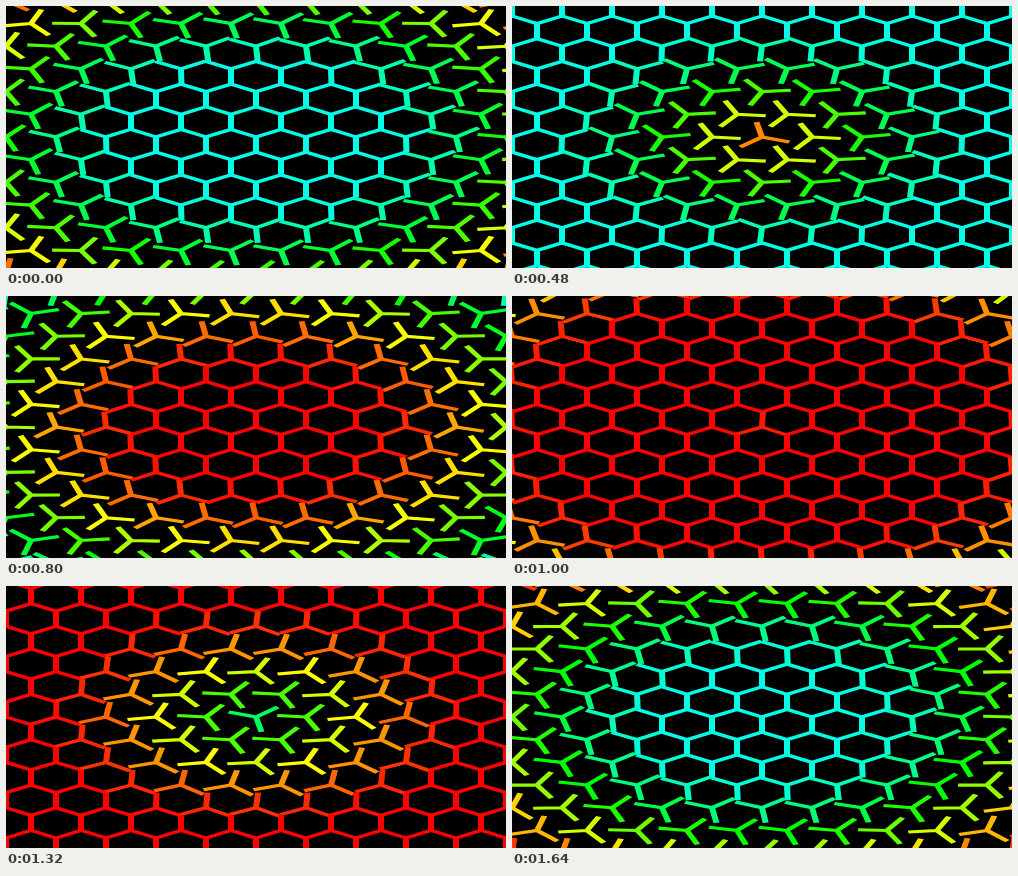
Recreate the animation shown at these times as an HTML page with a canvas. Size 500 by 262 pixels, loop 1680 ms.

```html
<!DOCTYPE html>
<html lang="en">
<head>
<meta charset="utf-8">
<title>Hexagon wave</title>
<style>
  html, body { margin: 0; width: 100%; height: 100%; overflow: hidden; background: #000; }
  canvas { display: block; }
</style>
</head>
<body>
<canvas id="stage" width="500" height="262"></canvas>
<script>
const ctx = document.getElementById('stage').getContext('2d');
const SIZE = 500, SQUASH = 262 / SIZE;
const LOOP = 1680, HALF = LOOP / 2, STEP = 40;
const GAP = 50, ARM = GAP / Math.sqrt(3), ROW = ARM * 1.5;
const TURN_START = 100, TURN_TIME = 530, DELAY = HALF / SIZE;
const MAX_HUE = 174;

const cells = [];
for (let row = -7; row <= 7; row++) {
  for (let col = -7; col <= 7; col++) {
    const x = (col + (row & 1) / 2) * GAP, y = row * ROW;
    cells.push({ x, y, delay: Math.hypot(x, y) * DELAY });
  }
}

const tip = a => [ARM * Math.sin(a), -ARM * Math.cos(a)];

const star = new Path2D();
star.moveTo(...tip(-Math.PI / 3));
star.lineTo(0, 0);
star.lineTo(...tip(Math.PI / 3));
star.moveTo(0, 0);
star.lineTo(...tip(Math.PI));

// Two turns of 60° per loop: cyan to red, then red to cyan.
function pose(time) {
  const t = ((time % LOOP) + LOOP) % LOOP;
  const second = t >= HALF;
  const x = Math.min(1, Math.max(0, (t % HALF - TURN_START) / TURN_TIME));
  const turn = (1 - Math.cos(Math.PI * x)) / 2;
  return {
    angle: (turn + second) * Math.PI / 3,
    hue: MAX_HUE * (second ? turn : 1 - turn)
  };
}

function draw(time) {
  ctx.setTransform(1, 0, 0, 1, 0, 0);
  ctx.fillStyle = '#000';
  ctx.fillRect(0, 0, 500, 262);
  ctx.lineWidth = 6;
  for (const { x, y, delay } of cells) {
    const { angle, hue } = pose(time - delay);
    ctx.setTransform(1, 0, 0, SQUASH, 250, 131);
    ctx.translate(x, y);
    ctx.rotate(angle);
    ctx.strokeStyle = `hsl(${hue}, 100%, 50%)`;
    ctx.stroke(star);
  }
}

function tick() {
  draw(Math.floor(performance.now() / STEP) * STEP);
  requestAnimationFrame(tick);
}
tick();
</script>
</body>
</html>
```
